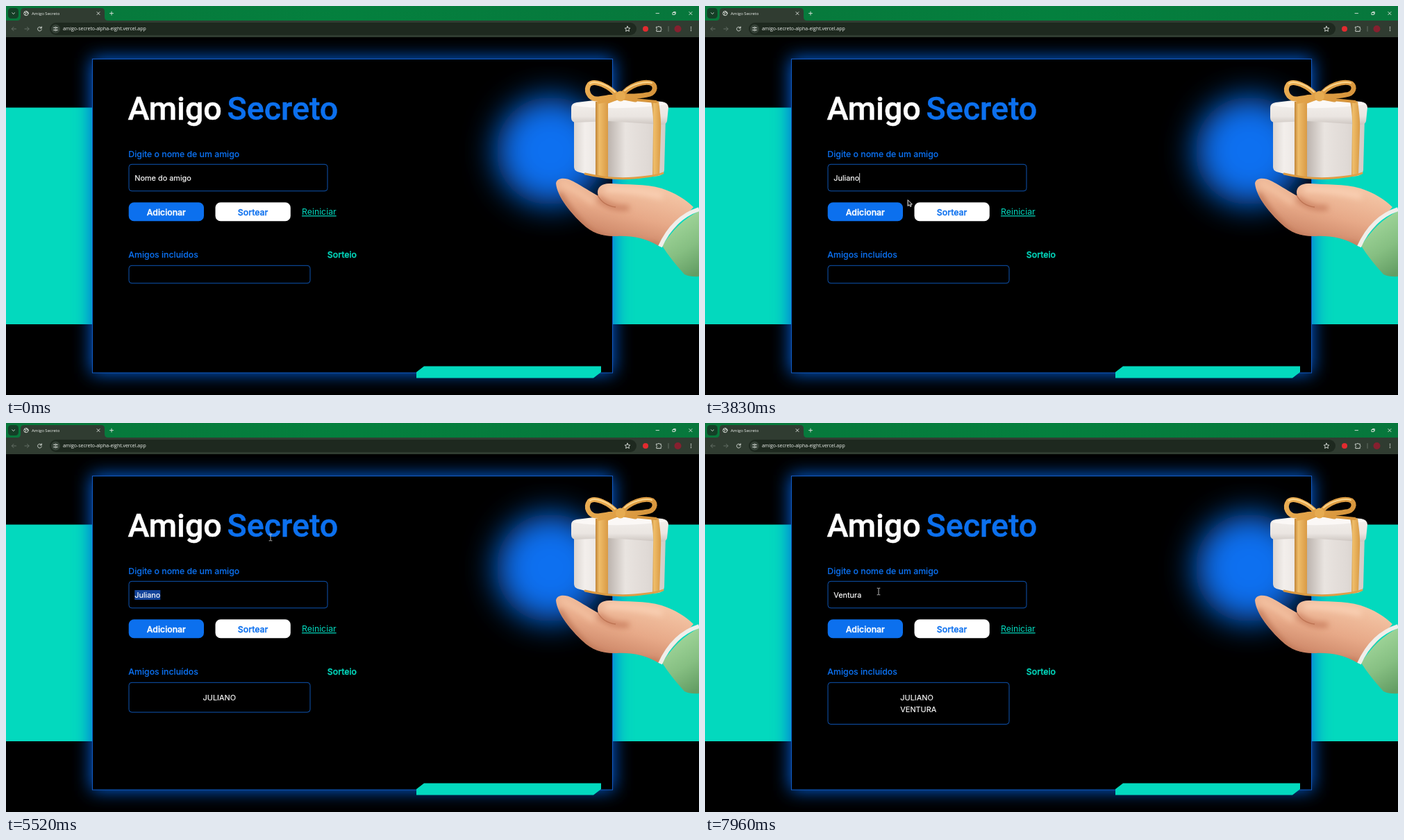
An HTML page for the animation above (8000 ms loop, 998 by 561 pixels).

```html
<!DOCTYPE html>
<html lang="pt-BR">
<head>
<meta charset="utf-8">
<title>Amigo Secreto</title>
<style>
html, body { margin: 0; width: 100%; height: 100%; overflow: hidden; background: #000; }
svg { display: block; width: 100vw; height: 100vh; }
text { white-space: pre; }
.ui { font: 6.94px "Open Sans", "Noto Sans", sans-serif; fill: #eef2ee; }
.title { font: 500 46.6px Roboto, sans-serif; stroke-width: .5px; }
.label { font: 500 12.3px Inter, sans-serif; stroke-width: .1px; }
.strong { stroke-width: .35px; }
.link { font: 12.3px Inter, sans-serif; fill: #03d9be; text-decoration: underline; }
.small { font: 10.9px Inter, sans-serif; fill: #fff; stroke: #fff; stroke-width: .15px; }
.blue { fill: #0c70ee; stroke: #0c70ee; }
.teal { fill: #03d9be; stroke: #03d9be; }
.white { fill: #fff; stroke: #fff; }
.field { fill: none; stroke: #0e54b2; }
.icon { fill: none; stroke: #dfe5df; stroke-width: .9; stroke-linecap: round; stroke-linejoin: round; }
.dim { stroke: #69746b; }
.gold { fill: none; stroke: url(#gold); stroke-linecap: round; stroke-linejoin: round; }
</style>
</head>
<body>
<svg viewBox="0 0 998 561" preserveAspectRatio="none">
<defs>
  <filter id="glow" x="-20%" y="-20%" width="140%" height="140%"><feGaussianBlur stdDeviation="13"/></filter>
  <filter id="ball" x="-80%" y="-80%" width="260%" height="260%"><feGaussianBlur stdDeviation="23"/></filter>
  <filter id="soft" x="-40%" y="-40%" width="180%" height="180%"><feGaussianBlur stdDeviation="4"/></filter>
  <linearGradient id="bar" x2="1" y2="0"><stop stop-color="#08773b"/><stop offset=".5" stop-color="#04803e"/><stop offset="1" stop-color="#07773c"/></linearGradient>
  <linearGradient id="gold" gradientUnits="userSpaceOnUse" x1="830" y1="105" x2="945" y2="250"><stop stop-color="#eeb257"/><stop offset=".45" stop-color="#d6943b"/><stop offset="1" stop-color="#e0a14a"/></linearGradient>
  <linearGradient id="strap" x2="1" y2="0"><stop stop-color="#c08437"/><stop offset=".3" stop-color="#efbd69"/><stop offset="1" stop-color="#d99a45"/></linearGradient>
  <linearGradient id="left" x2="1" y2="0"><stop stop-color="#dad4cf"/><stop offset=".3" stop-color="#f3efec"/><stop offset="1" stop-color="#e4deda"/></linearGradient>
  <linearGradient id="right" x2="1" y2="0"><stop stop-color="#bcb4ae"/><stop offset=".3" stop-color="#e9e4e0"/><stop offset=".7" stop-color="#dfd9d5"/><stop offset="1" stop-color="#d2ccc7"/></linearGradient>
  <linearGradient id="lid" x2="0" y2="1"><stop stop-color="#f6f2ef"/><stop offset=".7" stop-color="#eae5e1"/><stop offset="1" stop-color="#cdc6c1"/></linearGradient>
  <linearGradient id="skin" gradientUnits="userSpaceOnUse" x1="880" y1="252" x2="858" y2="336"><stop stop-color="#f3c3a3"/><stop offset=".5" stop-color="#e7a988"/><stop offset="1" stop-color="#c98263"/></linearGradient>
  <linearGradient id="sleeve" gradientUnits="userSpaceOnUse" x1="955" y1="320" x2="995" y2="385"><stop stop-color="#9dd397"/><stop offset=".5" stop-color="#86bf82"/><stop offset="1" stop-color="#649e64"/></linearGradient>
  <clipPath id="palm"><path id="hand" d="M792 256C793 247 806 247 817 253C828 259 842 268 853 274C849 263 857 255 871 256C892 258 921 256 944 263C963 269 979 279 990 290L940 346C922 335 900 331 880 332C862 333 844 328 830 314C815 300 794 276 792 256Z"/></clipPath>
</defs>

<rect width="998" height="561"/>
<rect y="146.5" width="998" height="312.5" fill="#03d9be"/>
<rect x="123" y="75" width="752" height="455" fill="#0a62e0" filter="url(#glow)"/>
<rect x="124.5" y="76.5" width="749" height="452.5" stroke="#0d5cc6"/>
<circle cx="784" cy="209" r="78" fill="#0c70f0" filter="url(#ball)"/>
<path d="M602 519.5H857V528L846 536.5H591V528Z" fill="#03d9be"/>

<!-- browser -->
<rect width="998" height="45" fill="#303c31"/>
<path d="M0 0H998V21H147Q142 21 142 16V8Q142 3 137 3H26Q21 3 21 8V16Q21 21 16 21H0Z" fill="url(#bar)"/>
<rect x="3" y="3" width="15" height="15" rx="4.5" fill="#153f27"/>
<rect x="63" y="24" width="845" height="18" rx="9" fill="#1e291f"/>
<circle cx="71.5" cy="33" r="6.5" fill="#364238"/>
<g class="icon">
  <path d="M8.8 9.8L10.7 11.6L12.6 9.8M131 8.6L135 12.6M135 8.6L131 12.6M149.5 10.6H154.5M152 8.1V13.1"/>
  <circle cx="29" cy="10.6" r="3.2"/><path d="M26.5 9L29 10L28 12.5M29.5 7.6L30 9.5L32 10"/>
  <path class="dim" d="M14.5 33H8.5M11 30.3L8.3 33L11 35.7M27 33H33M30.5 30.3L33.2 33L30.5 35.7"/>
  <path d="M50.8 31.3A2.9 2.9 0 1 0 51.3 34M51.3 29.8V32H49"/>
  <path d="M70 31.3H68.5M73 31.3H74.5M68.5 34.7H70M73 34.7H74.5"/><circle cx="71.5" cy="31.3" r="1"/><circle cx="71.5" cy="34.7" r="1"/>
  <path d="M895 29.2L896.1 31.7L898.8 32L896.8 33.8L897.4 36.5L895 35.1L892.6 36.5L893.2 33.8L891.2 32L893.9 31.7Z"/>
  <path d="M936.8 30.2H938.8Q940 28.2 941.2 30.2H943.2V32.2Q945.2 33.3 943.2 34.5V36.6H936.8V34.5Q938.5 33.3 936.8 32.2Z"/>
  <path d="M936 10.6H940.5M960.3 9.5H963.3V12.5H960.3ZM961.5 8.5H964.3V11.3M983.8 8.5L988 12.7M988 8.5L983.8 12.7"/>
  <path class="dim" d="M954 29.5V36.5"/>
  <path stroke-width="1.6" d="M986.5 30.5V30.5M986.5 33V33M986.5 35.5V35.5"/>
</g>
<circle cx="921" cy="33" r="4" fill="#e22b2f"/>
<circle cx="967.5" cy="33" r="5" fill="#87202f"/>
<text class="ui" x="37" y="12.8" style="font-size:6px">Amigo Secreto</text>
<text class="ui" x="82" y="35.3">amigo-secreto-alpha-eight.vercel.app</text>

<!-- form -->
<text class="title white" x="175.5" y="164">Amigo</text>
<text class="title blue" x="318.5" y="164">Secreto</text>
<text class="label blue" x="176.3" y="217.6">Digite o nome de um amigo</text>
<rect class="field" x="177" y="228.3" width="286" height="38.5" rx="4"/>
<rect x="176.7" y="283.2" width="108.3" height="27" rx="7.5" fill="#0c70ee"/>
<rect x="301.5" y="283.2" width="108.3" height="27" rx="7.5" fill="#fff"/>
<text class="label strong white" x="230.8" y="301.7" text-anchor="middle">Adicionar</text>
<text class="label strong blue" x="355.6" y="301.7" text-anchor="middle">Sortear</text>
<text class="link" x="426" y="301.2">Reiniciar</text>
<text class="label blue" x="176.3" y="363.2">Amigos incluídos</text>
<text class="label strong teal" x="462.8" y="363.2">Sorteio</text>
<rect id="list" class="field" x="177" y="374.3" width="261" height="26" rx="4"/>
<text id="name1" class="small" y="400"></text>
<text id="name2" class="small" y="417.3"></text>
<rect id="pick" x="185.3" y="241" height="14" fill="#13439a"/>
<text id="entry" class="small" x="185.3" y="252"></text>
<rect id="caret" y="241" width=".8" height="14" fill="#fff"/>

<!-- gift -->
<path d="M818 160H870V247Q842 245 823 239Q818 237 818 232Z" fill="url(#left)"/>
<path d="M867 160H950L948 237Q947 243 940 245Q905 250 867 247Z" fill="url(#right)"/>
<path d="M814 147Q814 140 822 139L880 132L945 138Q953 139 954 146L952 166Q951 171 944 171L867 166L820 168Q814 167 814 161Z" fill="url(#lid)"/>
<path d="M817 143Q820 139 880 133Q944 137 951 142Q910 148 867 147Q835 147 817 143Z" fill="#fbf8f6"/>
<path d="M849 138L867 136V248L849 245Z" fill="url(#strap)"/>
<path d="M929 136L940 138Q944 166 943 180L941 244L931 246L932 178Q933 160 929 136Z" fill="url(#strap)"/>
<g class="gold">
  <path d="M834 242Q872 251 905 248T946 241" stroke-width="3"/>
  <path d="M853 139L884 133L936 138" stroke-width="4"/>
  <g stroke-width="7">
    <path d="M882 131C869 115 847 106 840 113C834 121 839 134 851 134C863 133 873 130 882 131"/>
    <path d="M886 130C896 114 920 107 931 112C937 117 934 127 923 128C909 131 897 130 886 130"/>
    <path d="M880 132L867 137M890 132L906 135"/>
  </g>
</g>
<path d="M877 124C866 113 847 107 841 112M891 122C901 113 920 108 930 111" fill="none" stroke="#fbd68f" stroke-width="2" stroke-linecap="round"/>
<ellipse cx="885" cy="130" rx="7" ry="7.5" fill="#e6ab50"/>

<!-- hand -->
<use href="#hand" fill="url(#skin)"/>
<g clip-path="url(#palm)" fill="none">
  <g filter="url(#soft)">
    <path d="M796 270Q815 302 838 323T940 345" stroke="#b9704f" stroke-width="7"/>
    <path d="M852 276Q870 294 897 291" stroke="#c77c5c" stroke-width="7"/>
    <path d="M863 264Q908 265 945 274" stroke="#fad2b6" stroke-width="8"/>
    <path d="M800 256Q825 268 846 284" stroke="#f6c6a6" stroke-width="6"/>
  </g>
</g>
<path d="M852 273Q860 288 878 290" fill="none" stroke="#bd7353" stroke-width="1.5"/>
<path d="M998 296Q968 310 945 346Q957 365 977 387Q986 391 998 390Z" fill="url(#sleeve)"/>
<path d="M998 293Q961 305 942 347" fill="none" stroke="#f0eeea" stroke-width="6"/>

<g id="cursor" stroke="#fff" stroke-width=".9" stroke-linejoin="round">
  <path id="arrow" d="M0 0V8.8L2.1 7L3.6 9.8L5 9.1L3.7 6.4H6.3Z" fill="#111"/>
  <path id="beam" d="M-2.3 -4.8H-.5L0 -4.3L.5 -4.8H2.3M-2.3 4.8H-.5L0 4.3L.5 4.8H2.3M0 -4.3V4.3" fill="none" stroke="#ccc"/>
  <path id="point" d="M-1 0Q0 -1 1 0V4L4.8 5Q6 6 5 8L4 11H-1L-4 7Q-4 5 -1 7Z" fill="#111"/>
</g>
</svg>
<script>
const $ = id => document.getElementById(id);
const LOOP = 8000, TEXT_X = 185.3, LIST_MID = 307.3;
const NAMES = ['Juliano', 'Ventura'];
const KEYS = [[2310, 2620, 2690, 2830, 2930, 3040, 3140], [6030, 6240, 6380, 6520, 6600, 6680, 6760]];
const ADDED = [4010, 7650], SELECT = 4720;
// time, x, y of the pointer
const PATH = [
  [620, 560, 570], [1270, 244, 254], [1410, 236, 251], [1450, 236, 251], [1790, 568, 166],
  [3550, 568, 166], [3920, 245, 299], [4060, 245, 299], [4340, 271, 259], [4380, 271, 259],
  [4680, 213, 249], [4960, 213, 249], [5520, 381, 165], [7239, 381, 165], [7240, 381, 176],
  [7590, 245, 299], [7690, 245, 299], [7960, 250, 243]
];

const show = (el, on) => el.setAttribute('visibility', on ? 'inherit' : 'hidden');
const within = (x, y, l, t, r, b) => x >= l && x <= r && y >= t && y <= b;
const typed = (i, t) => NAMES[i].slice(0, KEYS[i].filter(k => k <= t).length);

function pointer(t) {
  const i = PATH.findIndex(p => p[0] > t);
  if (i < 0) return PATH[PATH.length - 1].slice(1);
  const [t0, x0, y0] = PATH[i - 1], [t1, x1, y1] = PATH[i];
  const u = (t - t0) / (t1 - t0), e = u * u * (3 - 2 * u);
  return [x0 + (x1 - x0) * e, y0 + (y1 - y0) * e];
}

function drawPointer(t) {
  const visible = t >= PATH[0][0];
  show($('cursor'), visible);
  const [x, y] = visible ? pointer(t) : [0, 0];
  const beam = within(x, y, 177, 228, 463, 267) || within(x, y, 177, 120, 480, 178);
  const point = within(x, y, 177, 283, 285, 310) || within(x, y, 302, 283, 410, 310);
  show($('beam'), beam);
  show($('point'), point);
  show($('arrow'), !beam && !point);
  // 'inherit' keeps every shape hidden along with its group
  $('cursor').setAttribute('transform', `translate(${x} ${y})`);
}

function drawForm(t) {
  const entry = $('entry'), second = t >= KEYS[1][0];
  entry.textContent = typed(second ? 1 : 0, t) || 'Nome do amigo';
  const width = entry.getComputedTextLength();
  show($('pick'), t >= SELECT && !second);
  $('pick').setAttribute('width', width);
  show($('caret'), (t >= 1450 && t < ADDED[0]) || (second && t < ADDED[1]));
  $('caret').setAttribute('x', TEXT_X + (t < KEYS[0][0] ? -.5 : width));
}

function drawList(t) {
  const count = ADDED.filter(a => a <= t).length;
  const rows = [$('name1'), $('name2')];
  rows.forEach((row, i) => row.textContent = i < count ? NAMES[i].toUpperCase() : '');
  const width = Math.max(...rows.map(row => row.textContent ? row.getComputedTextLength() : 0));
  rows.forEach(row => row.setAttribute('x', LIST_MID - width / 2));
  $('list').setAttribute('height', 25.5 + 17.3 * count);
}

function frame() {
  const t = performance.now() % LOOP;
  drawPointer(t);
  drawForm(t);
  drawList(t);
  requestAnimationFrame(frame);
}
frame();
</script>
</body>
</html>
```
